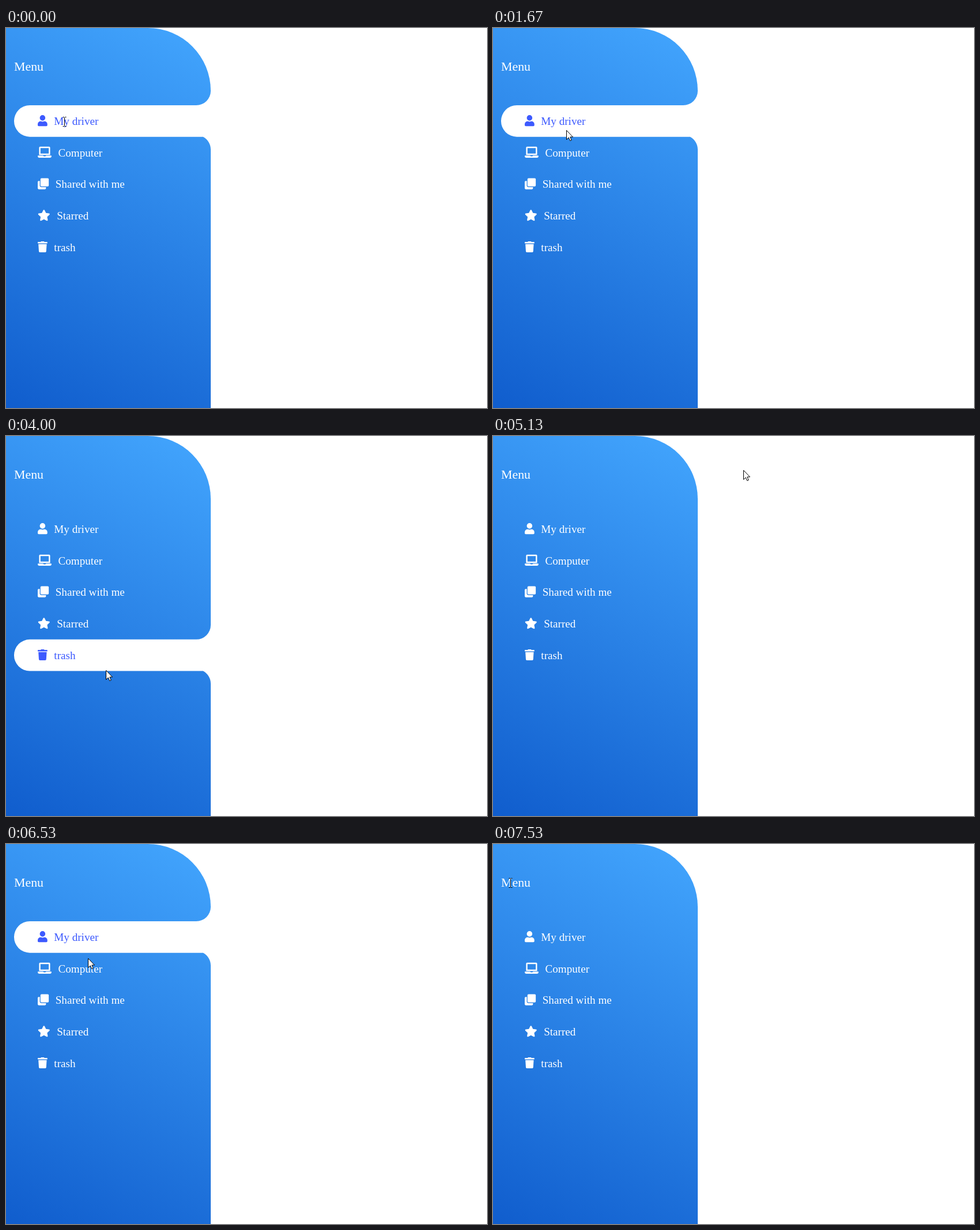
Write an HTML page that moves like this. It is 834 by 659 pixels and loops after 8 s.

```html
<!DOCTYPE html>
<html lang="en">
<head>
<meta charset="utf-8">
<title>Menu</title>
<style>
  html, body { margin: 0; width: 100%; height: 100%; overflow: hidden; background: #fff; }
  #panel {
    position: absolute; width: 355px; height: 659px;
    border-radius: 0 109px 0 0;
    background: linear-gradient(207deg, #43a6fe, #105dcd);
  }
  svg { position: absolute; left: 0; top: 0; }
  text { font: 19.14px "Liberation Serif", "Times New Roman", serif; }
  #title { font-size: 21.87px; }
  .row { fill: #fff; }
  .row.on { fill: #3d5afe; }
</style>
</head>
<body>
<div id="panel"></div>
<svg id="stage" width="834" height="659" viewBox="0 0 834 659">
  <path id="bar" fill="#fff" d="M356-25H355A25 25 0 0 1 330 0H41.3a27.35 27.35 0 0 0 0 54.7H341.8A25 25 0 0 1 355 76.7H356Z"/>
  <text id="title" x="14" y="74" fill="#fff">Menu</text>
  <g id="rows"></g>
  <path id="arrow" fill="#fff" stroke="#000" d="M.5.5V16.5L4.2 13L6.7 18.5L9.2 17.4L6.8 12H11.5Z"/>
  <path id="beam" fill="none" stroke="#000" d="M-2.5-7.5H-.5L.5-6.5L1.5-7.5H3.5M.5-6.5V7.5M-2.5 8.5H-.5L.5 7.5L1.5 8.5H3.5"/>
</svg>
<script>
const LOOP = 8000, TICK = 1000 / 15;
const TOP = 134, PITCH = 54.7, LEFT = 14, RIGHT = 355, EM = 19.14;
const $ = id => document.getElementById(id);

// label, icon width in 1/512 em, icon outline
const items = [
  ["My driver", 448, "M224 0a128 128 0 1 1 0 256a128 128 0 1 1 0-256ZM134 288H151a175 175 0 0 0 146 0H314A134 134 0 0 1 448 422V464a48 48 0 0 1-48 48H48a48 48 0 0 1-48-48V422A134 134 0 0 1 134 288Z"],
  ["Computer", 640, "M112 0H528a48 48 0 0 1 48 48V384H64V48A48 48 0 0 1 112 0ZM128 64V320H512V64ZM16 416H255a33 33 0 0 0 33 32h61a33 33 0 0 0 33-32H624a16 16 0 0 1 16 16v16a64 64 0 0 1-64 64H64a64 64 0 0 1-64-64V432a16 16 0 0 1 16-16Z"],
  ["Shared with me", 512, "M176 0H464a48 48 0 0 1 48 48V336a48 48 0 0 1-48 48H176a48 48 0 0 1-48-48V48a48 48 0 0 1 48-48ZM176 416a80 80 0 0 1-80-80V128H48a48 48 0 0 0-48 48V464a48 48 0 0 0 48 48H336a48 48 0 0 0 48-48V416Z"],
  ["Starred", 576, "M259 18L194 150L48 171c-26 4-37 36-18 55l106 103l-25 146c-4 26 23 46 46 33l131-68l131 68c23 12 51-7 46-33l-25-146l106-103c19-19 8-51-18-55L382 150L317 18c-12-24-46-24-58 0Z"],
  ["trash", 448, "M432 32H312l-9-19A24 24 0 0 0 281 0H167a24 24 0 0 0-22 13L136 32H16A16 16 0 0 0 0 48v32a16 16 0 0 0 16 16H432a16 16 0 0 0 16-16V48a16 16 0 0 0-16-16ZM53 467a48 48 0 0 0 48 45H347a48 48 0 0 0 48-45L416 128H32Z"]
];

$("rows").innerHTML = items.map(([label, width, d], i) => {
  const base = TOP + i * PITCH + 34, scale = EM / 512;
  return `<g class="row"><path fill-rule="evenodd" d="${d}" transform="translate(55 ${base - 16.9}) scale(${scale})"/>
    <text x="${66.6 + width * scale}" y="${base}">${label}</text></g>`;
}).join("");
const rows = [...document.querySelectorAll(".row")];
const textBoxes = [...document.querySelectorAll("text")].map(t => t.getBBox());

// pointer path: tick, x, y
const path = [
  [0, 101, 162], [2, 106, 115], [7, 106, 115], [13, 124, 174], [24, 124, 174],
  [25, 127, 177], [27, 128, 232], [35, 128, 232], [37, 131, 286], [44, 131, 286],
  [45, 133, 296], [46, 136, 338], [52, 136, 338], [54, 145, 390], [59, 145, 390],
  [61, 200, 421], [63, 330, 400], [64, 400, 330], [67, 495, 63], [76, 495, 63],
  [77, 434, 59], [80, 220, 110], [81, 190, 150], [86, 160, 482], [89, 160, 400],
  [95, 125, 71], [96, 125, 71], [97, 134, 150], [98, 142, 198], [102, 160, 468],
  [103, 165, 468], [105, 169, 385], [106, 170, 358], [108, 165, 235], [110, 100, 150],
  [112, 45, 82], [113, 30, 67], [120, 30, 67]
];

function pointerAt(tick) {
  const i = path.findIndex(p => p[0] > tick);
  const [t0, x0, y0] = path[i - 1], [t1, x1, y1] = path[i];
  const f = (tick - t0) / (t1 - t0);
  return [Math.round(x0 + (x1 - x0) * f), Math.round(y0 + (y1 - y0) * f)];
}

function rowAt([x, y]) {
  const i = Math.floor((y - TOP) / PITCH);
  return x >= LEFT && x < RIGHT && i >= 0 && i < items.length ? i : -1;
}

function draw(now) {
  const tick = Math.floor((now % LOOP + 4) / TICK) % 120;
  const [x, y] = pointerAt(tick);
  const active = rowAt(pointerAt(Math.max(0, tick - 1))); // hover trails the pointer by one tick
  rows.forEach((row, i) => row.classList.toggle("on", i === active));
  $("bar").style.display = active < 0 ? "none" : "";
  $("bar").setAttribute("transform", `translate(0 ${TOP + active * PITCH})`);

  const overText = textBoxes.some(b => x >= b.x && x <= b.x + b.width && y >= b.y && y <= b.y + b.height);
  $("arrow").style.display = overText ? "none" : "";
  $("beam").style.display = overText ? "" : "none";
  $(overText ? "beam" : "arrow").setAttribute("transform", `translate(${x} ${y})`);
}

function frame() {
  draw(performance.now());
  requestAnimationFrame(frame);
}
frame();
</script>
</body>
</html>
```
